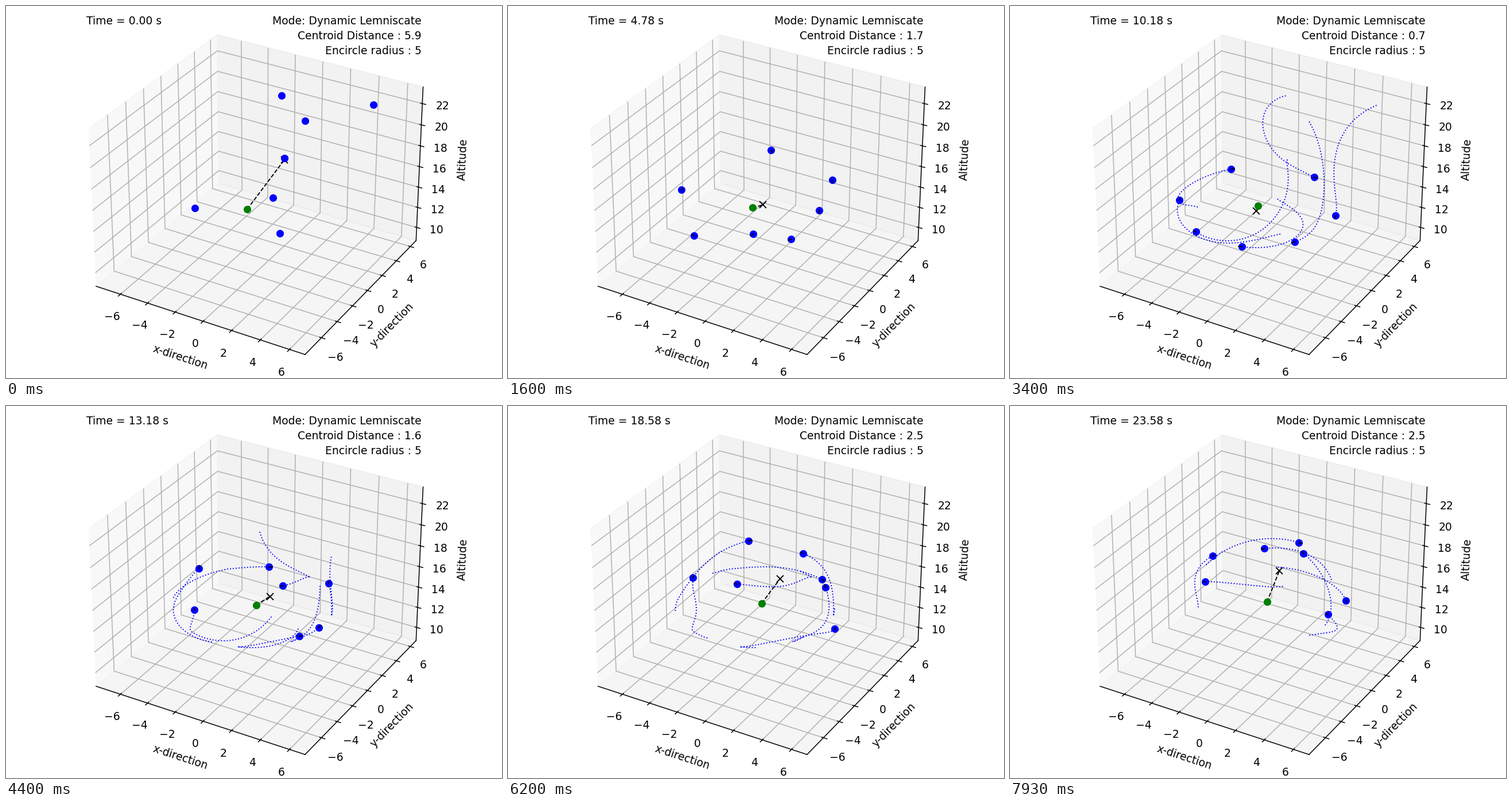
A matplotlib script that plays this animation: 864x648 px, repeating every 8 s.

```python
import numpy as np
import matplotlib.pyplot as plt
from matplotlib.animation import FuncAnimation

W, H, DPI = 864, 648, 135
FRAMES, LOOP_MS = 120, 8000
STEP = 0.2          # simulated seconds per frame
TAIL = 10.0         # simulated seconds covered by a trail
SWITCH = 10.2       # moment the circle turns into the twisted curve

N, RADIUS = 7, 5
GAP = 2 * np.pi / N
I = np.arange(N)
SLOT = np.where(I < 4, 4 - I, (I + 1) % N)   # the first four reverse order

START = np.array([(-0.38, 2.21, 22.93), (5.41, 3.33, 23.43), (2.57, -0.18, 23.13),
                  (1.24, -1.68, 16.43), (2.33, -2.23, 20.93), (2.47, -2.98, 14.43),
                  (-3.62, -2.98, 14.43)])
TARGET = np.array([-1, -1, 14])
DRIFT = np.array([0.017, 0.055, 0])
SETTLE_XYZ = np.array([0.8, 0.8, 1.65])


def target(t):
    return TARGET + DRIFT * t[..., None]


def circle(t):
    """Flat ring whose uneven spacing evens out."""
    uneven = np.radians(52.5) * np.exp(-0.11 * t) * np.cos(GAP * (I - 1.2))
    phi = np.radians(156.6 - 7.3 * t) - GAP * I - uneven
    return RADIUS * np.stack([np.cos(phi), np.sin(phi), 0 * phi], -1)


def lemniscate(t):
    """Figure eight on a sphere, slowly tilting about the x axis."""
    psi = np.radians(225 - 7 * t) + GAP * (3 - SLOT)
    tilt = np.radians(6.5 * (t - 15.6))
    lift, side = np.sin(psi) ** 2, np.sin(psi) * np.cos(psi)
    return RADIUS * np.stack([-np.cos(psi),
                              lift * np.cos(tilt) + side * np.sin(tilt),
                              lift * np.sin(tilt) - side * np.cos(tilt)], -1)


def settle(t, tau):
    s = np.maximum(t, 0)[..., None] / tau
    return (1 + s) * np.exp(-s)


def gather(t):
    zero = np.zeros((1, 1))
    return circle(t) + (START - TARGET - circle(zero)) * settle(t, SETTLE_XYZ)


def swarm(t):
    """Agent positions, shape (times, agents, 3)."""
    t = np.reshape(t, (-1, 1))
    turn = np.full((1, 1), SWITCH)
    late = lemniscate(t) + (gather(turn) - lemniscate(turn)) * settle(t - SWITCH, 1.2)
    return target(t) + np.where(t[..., None] < SWITCH, gather(t), late)


fig = plt.figure(figsize=(W / DPI, H / DPI), dpi=DPI)
ax = fig.add_axes([0, 0, 1, 1], projection="3d")


def line(style, **kw):
    return ax.plot([], [], [], style, **kw)[0]


link = line("k--", lw=1)
cross = line("kx")
trails = [line("b:", lw=1) for _ in I]
dots = line("bo")
heads = line("k-", lw=1)
goal = line("go")

ax.set_xticks(range(-6, 7, 2))
ax.set_yticks(range(-6, 7, 2))
ax.set_zticks(range(10, 23, 2))
ax.set_xlim(-7.815, 7.055)
ax.set_ylim(-8.03, 6.84)
ax.set_zlim(8.675, 23.545)
ax.set_xlabel("x-direction")
ax.set_ylabel("y-direction")
ax.set_zlabel("Altitude")


def note(x, y, text="", ha="right"):
    return ax.text2D(x, y, text, ha=ha, transform=ax.transAxes)


clock = note(0.05, 0.95, ha="left")
note(0.95, 0.95, "Mode: Dynamic Lemniscate")
gap_text = note(0.95, 0.91)
note(0.95, 0.87, f"Encircle radius : {RADIUS}")


def draw(i):
    t = max(0.0, STEP * i - 0.02)
    pos = swarm(t)[0]
    mid = pos.mean(axis=0)
    aim = target(np.array(t))

    dots.set_data_3d(*pos.T)
    cross.set_data_3d(*mid[:, None])
    goal.set_data_3d(*aim[:, None])
    link.set_data_3d(*np.array([aim, mid]).T)

    # Trails show once a full tail has been recorded
    path = swarm(np.linspace(t - TAIL, t, 250)) if t > TAIL else np.empty((0, N, 3))
    for k, trail in enumerate(trails):
        trail.set_data_3d(*path[:, k].T)

    # Short heading tick inside each dot
    v = pos - swarm(t - 0.05)[0]
    v *= 0.2 / np.linalg.norm(v, axis=1, keepdims=True)
    ticks = np.stack([pos, pos + v, np.full_like(pos, np.nan)], axis=1)
    heads.set_data_3d(*ticks.reshape(-1, 3).T)
    heads.set_visible(t > 0)

    clock.set_text(f"Time = {t:.2f} s")
    gap_text.set_text(f"Centroid Distance : {np.linalg.norm(mid - aim):.1f}")
    return [link, cross, *trails, dots, heads, goal, clock, gap_text]


anim = FuncAnimation(fig, draw, frames=FRAMES, interval=LOOP_MS / FRAMES,
                     repeat=True, repeat_delay=0)
plt.show()
```
